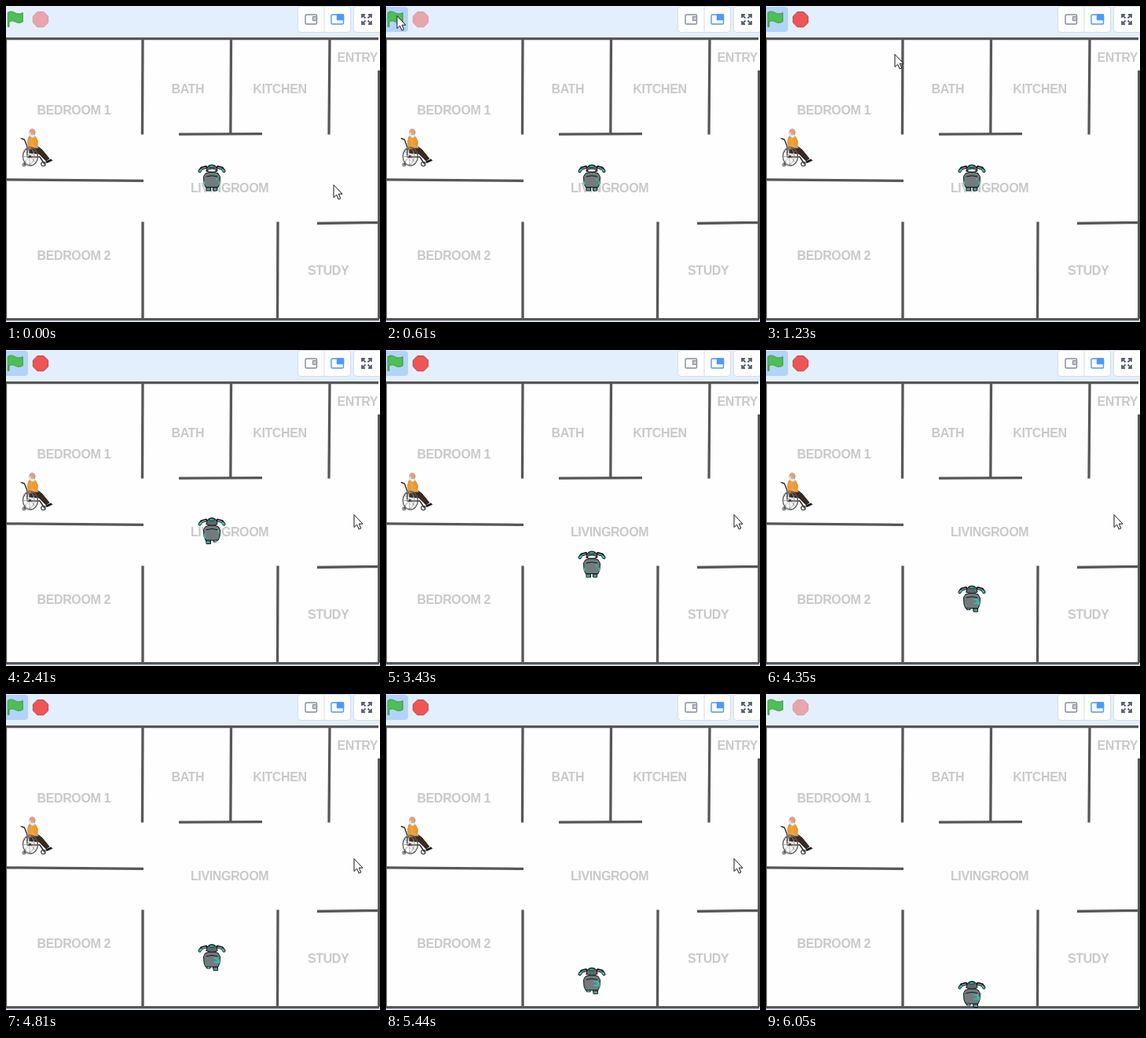
An HTML page that plays this animation: 476x402 px, repeating every 9460 ms.

```html
<!DOCTYPE html>
<html lang="en">
<head>
<meta charset="utf-8">
<title>Floor plan robot</title>
<style>
  html, body { margin: 0; width: 100%; height: 100%; overflow: hidden; background: #e4effd; }
  svg { display: block; width: 476px; height: 402px; }
  .label { font: bold 16px "Liberation Sans", Arial, sans-serif; letter-spacing: -.4px; fill: #c9c9c9; }
  .walls { fill: none; stroke: #575759; stroke-width: 3.3; }
  .button { fill: #fff; stroke: #d3dceb; }
  .ink { stroke: #101517; stroke-linejoin: round; stroke-linecap: round; }
  .line { fill: none; }
</style>
</head>
<body>
<svg viewBox="0 0 476 402">
  <rect width="476" height="402" fill="#e4effd"/>

  <!-- toolbar -->
  <rect id="glow" x="-4" y="1" width="32" height="32" rx="4" fill="#b4d3fa"/>
  <path d="M2.300 8.400C5.800 6 8.800 7 11.500 8.600S17.500 10.600 21.300 8.600V20C17.500 22 14.500 21.600 11.500 20S7 18.600 4 20V26.400H2.300Z"
        fill="#4cbf56" stroke="#45993d" stroke-linejoin="round"/>
  <path id="stop" d="M40 7.500h8l5.600 5.600v8L48 26.700h-8l-5.600-5.600v-8Z" stroke-linejoin="round"/>
  <rect class="button" x="371.5" y=".5" width="67" height="33" rx="4"/>
  <path d="M405 1V33" stroke="#d3dceb"/>
  <g fill="none" stroke="#858a99" stroke-width="1.4">
    <rect x="381" y="11" width="14.5" height="12" rx="1.5"/>
    <rect x="390.500" y="13.500" width="5" height="5" fill="#c3c6cf" stroke-width="1"/>
  </g>
  <g stroke="#4c97ff" stroke-width="1.4">
    <rect x="414" y="11" width="15.5" height="12" rx="1.5" fill="#fff"/>
    <path d="M421.5 11h8v6.500h-8Z" fill="#4c97ff"/>
  </g>
  <rect class="button" x="442.5" y=".5" width="36" height="33" rx="4"/>
  <path d="M453 15v-4h4M453 11l4.500 4.500M461 11h4v4M465 11l-4.500 4.500M453 19v4h4M453 23l4.500-4.500M465 19v4h-4M465 23l-4.500-4.500"
        fill="none" stroke="#575e75" stroke-width="1.800"/>

  <!-- floor plan -->
  <rect x="0" y="40" width="476" height="360" rx="4" fill="#fefefe"/>
  <path class="walls" d="M0 41.600H474M174 42L173.500 163.500M286.500 42L285.800 163M412 42L411 163.500M220 163.200L326 162.700
    M0 220.800L175 222.400M174 274.500V398M346 274.500L345.500 398M396 276.500L474 275.300M474.700 82V398M0 398.600H475"/>
  <path d="M.5 41V399" stroke="#575759" stroke-width="1.300"/>
  <g id="labels"></g>

  <!-- wheelchair -->
  <g stroke-linejoin="round" stroke-linecap="round">
    <path class="line" d="M19.500 168.500l4 1.500L27 179v11M27 192h16l6 9M24 198l-1 4" stroke="#2c2c2c" stroke-width="1.400"/>
    <path d="M29 180l12-1 5 4 9 11-4 3-9-9-12-1Z" fill="#3a2a20" stroke="#17110e" stroke-width=".8"/>
    <path d="M50 198l7-3.500 2.500 2-7.500 3.500Z" fill="#151515"/>
    <path d="M29 166.500q4-3 8.500 0l3 6-1 8-10 1.500-2-8Z" fill="#f59a23" stroke="#a96512" stroke-width=".6"/>
    <path class="line" d="M32 170l1.500 7.500 7 2.500" stroke="#e0a57c" stroke-width="1.800"/>
    <ellipse cx="33.500" cy="160.800" rx="3.600" ry="4.300" fill="#e3a27f" stroke="#a4715a" stroke-width=".5"/>
    <path d="M29.800 160.500l1.500 0 1 3.500 4.500-.5-.5 3.500q-3.500 2-5.500-1Z" fill="#f2f2f2" stroke="#aaa" stroke-width=".4"/>
    <g fill="none">
      <ellipse cx="31" cy="191.500" rx="9.500" ry="11.500" stroke="#555" stroke-width="1.400"/>
      <ellipse cx="28.500" cy="191" rx="7.500" ry="11" stroke="#999" stroke-width="1"/>
      <path d="M24 185l13 13M24 198l13-13M30 180v23M22 191.500h17" stroke="#888" stroke-width=".7"/>
      <circle cx="30.500" cy="191.500" r="1.800" fill="#444"/>
      <circle cx="47.500" cy="201" r="2.700" stroke="#444" stroke-width="1.200"/>
      <circle cx="23" cy="202" r="2" stroke="#555"/>
    </g>
  </g>

  <!-- robot, origin at top centre -->
  <g id="robot" class="ink">
    <path id="legs" fill="#58696b"/>
    <path d="M-8 12.500Q0 9 8 12.500L10.500 17 10 25 8 30H-8L-10 25-10.500 17Z" fill="#727c7d"/>
    <path class="line" d="M-7.500 4.500L-13 6-15.500 9.500M7.500 4.500L13 6 15.500 9.500" stroke-width="4"/>
    <path class="line" d="M-8 5l-4 1M8 5l4 1" stroke="#8b9799" stroke-width="1.700"/>
    <path class="line" d="M-13.500 7.500l-2 2M13.500 7.500l2 2" stroke="#35c9c0" stroke-width="2.200"/>
    <path d="M-7 9.500Q-6.500 1.500 0 1.500T7 9.500Q0 13-7 9.500Z" fill="#5b686a"/>
    <path d="M-3.500 3Q0 1 3.500 3L2.500 5h-5Z" fill="#2fb9b1" stroke-width=".7"/>
    <path id="face" d="M-5.500 8Q0 5 5.500 8L4 10.500H-4Z" fill="#eef3f3" stroke-width=".8"/>
    <path class="line" d="M-7 16.500q7-2.500 14 0" stroke-width="1"/>
    <path id="trim" class="line" stroke="#2cc4b0" stroke-width="1.700"/>
  </g>

  <path id="cursor" d="M0 .5V16.500L3.700 13.200 6.200 19 8.800 17.900 6.300 12.200H11Z"
        fill="#fff" stroke="#16161c" stroke-linejoin="round"/>
</svg>
<script>
const LOOP = 9460;
const $ = id => document.getElementById(id);

const LABELS = [
  ['BEDROOM 1', 39.6, 137.6], ['BATH', 210.5, 110.6], ['KITCHEN', 314.3, 110.6],
  ['ENTRY', 421.5, 71], ['LIVINGROOM', 235, 237.2], ['BEDROOM 2', 39.6, 322.8],
  ['STUDY', 384, 342.4]
];
for (const [text, x, y] of LABELS) {
  const el = document.createElementNS('http://www.w3.org/2000/svg', 'text');
  el.textContent = text;
  el.setAttribute('class', 'label');
  el.setAttribute('x', x);
  el.setAttribute('y', y);
  $('labels').append(el);
}

// start ms, end ms, steps, first y, last y
const WALKS = [
  [2320, 2720, 6, 208.5, 226.5], [2870, 3260, 6, 230.5, 250.5], [3430, 3810, 6, 254.5, 274],
  [3960, 4350, 6, 278, 298.5], [4500, 5190, 10, 300, 338.5], [5360, 5740, 6, 342.5, 364]
];

// start ms, end ms, steps, from, to, easing for x and y
const inOut = u => u * u * (3 - 2 * u);
const out = p => u => 1 - (1 - u) ** p;
const MOVES = [
  [70, 610, 8, [417, 227], [14, 12], inOut, inOut],
  [1160, 1860, 10, [14, 12], [431, 210.5], out(2), out(1.27)],
  [2010, 2090, 2, [431, 210.5], [443, 209], out(1), out(1)]
];

const POSES = {
  stand: { legs: 'M-7 28h5.500v6.500h-5ZM1.500 28H7l-.5 6.500H2Z', trim: 'M-9.500 23v3M9.500 23v3M-5.500 33h2.500M3 33h2.500M6 19v2' },
  left: { legs: 'M-7.500 28h6v6.500h-5ZM2 28h5.500l-2 4H2.500Z', trim: 'M-9 22v5M-6 32.500h2.500M4 31h1.500M8 17l1 3' },
  right: { legs: 'M-7.500 28h5.500v4h-4ZM1.500 28h6v6.500h-5Z', trim: 'M3 19h4v5H3M-5 31h1.500M4 33h2.500M9 21v4' }
};

const stepAt = (t, start, end, n) =>
  Math.min(n - 1, Math.floor((t - start) / ((end - start) / (n - 1)) + 0.2));
const lerp = (a, b, u) => a + (b - a) * u;
const show = (el, on) => el.setAttribute('display', on ? 'inline' : 'none');

function robotAt(t) {
  let state = { y: 200.5, pose: 'stand' };
  WALKS.forEach(([start, end, n, first, last], i) => {
    if (t < start) return;
    const k = stepAt(t, start, end, n);
    state = { y: lerp(first, last, k / (n - 1)), pose: k === 0 ? 'stand' : i ? 'right' : 'left' };
  });
  return state;
}

function cursorAt(t) {
  let pos = MOVES[0][3];
  for (const [start, end, n, from, to, easeX, easeY] of MOVES) {
    if (t < start) break;
    const u = (stepAt(t, start, end, n) + 1) / n;
    pos = [lerp(from[0], to[0], easeX(u)), lerp(from[1], to[1], easeY(u))];
  }
  return pos;
}

function draw(t) {
  const running = t >= 870 && t < 5970;
  show($('glow'), t >= 610 && t < 5970);
  $('stop').setAttribute('fill', running ? '#ef5555' : '#e8a5ae');
  $('stop').setAttribute('stroke', running ? '#b84848' : '#d997a3');

  const { y, pose } = robotAt(t);
  $('robot').setAttribute('transform', `translate(262 ${y})`);
  $('legs').setAttribute('d', POSES[pose].legs);
  $('trim').setAttribute('d', POSES[pose].trim);
  show($('face'), pose === 'stand');

  show($('cursor'), t < 5970);
  $('cursor').setAttribute('transform', `translate(${cursorAt(t).map(Math.round).join(' ')})`);
}

const origin = performance.now();
function tick() {
  draw((performance.now() - origin) % LOOP);
  requestAnimationFrame(tick);
}
tick();
</script>
</body>
</html>
```
